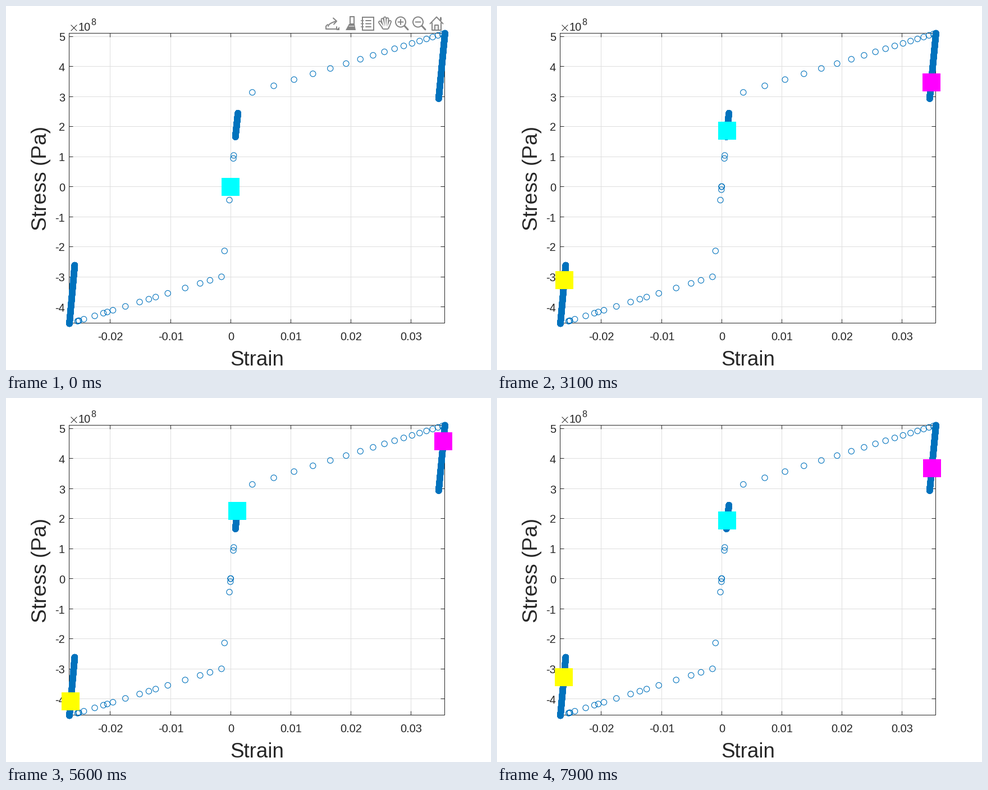
A matplotlib script for the animation above (8000 ms loop, 864 by 648 pixels).

```python
import numpy as np
import matplotlib.pyplot as plt
from matplotlib.animation import FuncAnimation
from matplotlib.patches import Circle, PathPatch, Polygon, Rectangle
from matplotlib.path import Path

W, H, DPI = 864, 648, 100
PX = 72 / DPI                       # one pixel in points
FRAMES, STEP_MS = 80, 100
RAMP_END = 10                       # last frame of the loading ramp
PEAK, PERIOD = 10.61, 5.56          # first load peak and cycle length, in frames
TOOLBAR_OFF = 14
BLUE, INK, GRID, ICON = "#0072bd", "#262626", "#dedede", "#858585"
LEFT, RIGHT, TOP, BOTTOM = 112.5, 781.5, 48.5, 564.5
ORIGIN = (400.2, 321.5)

plt.rcParams["font.family"] = "Liberation Sans"
fig = plt.figure(figsize=(W / DPI, H / DPI), dpi=DPI, facecolor="white")
ax = fig.add_axes([0, 0, 1, 1])
ax.set_xlim(0, W)
ax.set_ylim(H, 0)
ax.axis("off")


def line(xs, ys, color=INK, width=1, z=2, **kw):
    return ax.plot(xs, ys, color=color, lw=width * PX, zorder=z,
                   snap=False, **kw)[0]


def text(x, y, s, size, **kw):
    kw = {"ha": "center", "va": "baseline", "color": INK, **kw}
    return ax.text(x, y, s, fontsize=size * PX, zorder=4, **kw)


def draw_axes():
    tick = 6.5
    for n in range(-2, 4):
        x = np.floor(ORIGIN[0] + 107.2 * n) + 0.5
        line([x, x], [TOP, BOTTOM], GRID, z=1)
        line([x, x], [BOTTOM, BOTTOM - tick])
        line([x, x], [TOP, TOP + tick])
        text(x, 595, f"{n / 100:g}", 20)
    for n in range(-4, 6):
        y = np.floor(ORIGIN[1] - 53.5 * n) + 0.5
        line([LEFT, RIGHT], [y, y], GRID, z=1)
        line([LEFT, LEFT + tick], [y, y])
        line([RIGHT, RIGHT - tick], [y, y])
        text(105, y + 8, str(n), 20, ha="right")
    line([LEFT, RIGHT, RIGHT, LEFT, LEFT], [TOP, TOP, BOTTOM, BOTTOM, TOP],
         solid_joinstyle="miter")
    line([116, 126], [34, 44])
    line([116, 126], [44, 34])
    text(128, 44, "10", 20, ha="left")
    text(151, 34, "8", 16, ha="left")
    text(447, 640, "Strain", 36.7)
    text(71.5, 306.5, "Stress (Pa)", 37.2, rotation=90, rotation_mode="anchor")


def toolbar():
    """Grey tool icons above the top right corner of the axes."""
    parts = []

    def stroke(xs, ys, width=2, color=ICON):
        parts.append(line(xs, ys, color, width, 8,
                          solid_capstyle="round", solid_joinstyle="round"))

    def shape(patch, fill=False):
        patch.set(zorder=8, fill=fill, ec=ICON, fc=ICON, lw=0 if fill else 2 * PX)
        parts.append(ax.add_patch(patch))

    # export
    t = np.linspace(0, 1, 12)
    stroke([573, 570, 570, 589, 589], [33, 36, 41, 41, 37])
    stroke(574 + 14 * t, 36 - 9 * np.sqrt(t))
    stroke([583, 589, 584], [21.5, 27, 32.5])
    shape(Polygon([(588, 43), (594, 43), (594, 37)]), fill=True)
    # brush
    shape(Rectangle((613, 19), 6.5, 13))
    shape(Polygon([(611, 32), (621, 32), (623, 43), (605, 43)]), fill=True)
    stroke([611, 620], [36, 36], 1, "white")
    # list
    shape(Rectangle((634.5, 20), 20.5, 23))
    for y in (26, 31.5, 37):
        stroke([641, 650], [y, y])
        stroke([632.5, 637], [y, y], 1.5)
    # hand: a grey pass, then a thinner white one
    for color, width in ((ICON, 6), ("white", 2.2)):
        for i in range(-2, 3):
            stroke([675 + 4.5 * i, 676 + 2.5 * i],
                   [21.5 + 1.6 * i * i + (i < 0), 36], width, color)
        stroke([673, 679], [38, 38], width + 2, color)
    # zoom in, zoom out
    for cx in (703, 734):
        shape(Circle((cx, 28.5), 9))
        stroke([cx + 7, cx + 13], [35.5, 42], 3)
        stroke([cx - 4.5, cx + 4.5], [28.5, 28.5])
    stroke([703, 703], [24, 33])
    # home
    stroke([755.5, 767, 778.5], [31.5, 19.5, 31.5])
    stroke([759, 759, 775, 775], [30, 43, 43, 30])
    stroke([764, 764, 770, 770], [43, 34, 34, 43])
    stroke([774.5, 774.5], [21, 25], 3)
    return parts


class Probe:
    """A loading ramp, two samples per frame, then a cycle between two ends."""

    def __init__(self, color, elastic, plastic, low, high, z):
        self.low, self.high = np.array(low), np.array(high)
        self.ramp = np.vstack([ORIGIN, elastic, plastic, high])
        self.box = Rectangle((0, 0), 32, 32, fc=color, lw=0, zorder=z, snap=True)
        ax.add_patch(self.box)

    def cycle(self, frame):
        s = (1 + np.cos(2 * np.pi * (frame - PEAK) / PERIOD)) / 2
        return self.low + np.outer(s, self.high - self.low)

    def trace(self):
        pts = np.vstack([self.ramp, self.cycle(np.arange(10.5, 160, 0.5))])
        rings = [Path.circle(p, 5.1) for p in pts]
        ax.add_patch(PathPatch(Path.make_compound_path(*rings), fill=False,
                               ec=BLUE, lw=1.1 * PX, zorder=3))

    def place(self, i):
        x, y = self.ramp[2 * i] if i <= RAMP_END else self.cycle(i)[0]
        self.box.set_xy((x - 16, y - 16))


def blend(a, b, share):
    return np.array(a) + np.outer(share, np.subtract(b, a))


# Plastic flow slows down towards the tip, with a slight stick and slip.
k = np.arange(3, 20)
u = (k - 3) / 17
bottom_flow = 0.979 - (1 - u) ** 1.65 + 0.024 * np.cos(2 * np.pi * (k - 12) / 4.5)
top_flow = 1 - (1 - u) ** 1.8 + 0.022 * np.sin(2 * np.pi * u)

bottom_tip, top_tip, middle_tip = (113, 565.5), (782, 48.5), (413.2, 190.8)
middle_low = (408.7, 233)
probes = [
    Probe("yellow", [(398, 345.5), (389.3, 436)],
          blend((384.7, 481.8), bottom_tip, bottom_flow),
          (122.4, 461.5), bottom_tip, 5),
    Probe("magenta", [(405.7, 266), (411, 212)],
          blend((438.8, 153.8), top_tip, top_flow),
          (770.8, 165), top_tip, 6),
    Probe("cyan", [(399.8, 327), (405, 271.3)],
          blend(middle_low, middle_tip, u), middle_low, middle_tip, 7),
]
draw_axes()
for p in probes:
    p.trace()
icons = toolbar()


def update(i):
    for p in probes:
        p.place(i)
    for part in icons:
        part.set_visible(i < TOOLBAR_OFF)
    return [p.box for p in probes] + icons


anim = FuncAnimation(fig, update, frames=FRAMES, interval=STEP_MS,
                     repeat=True, repeat_delay=0, blit=False)
plt.show()
```
